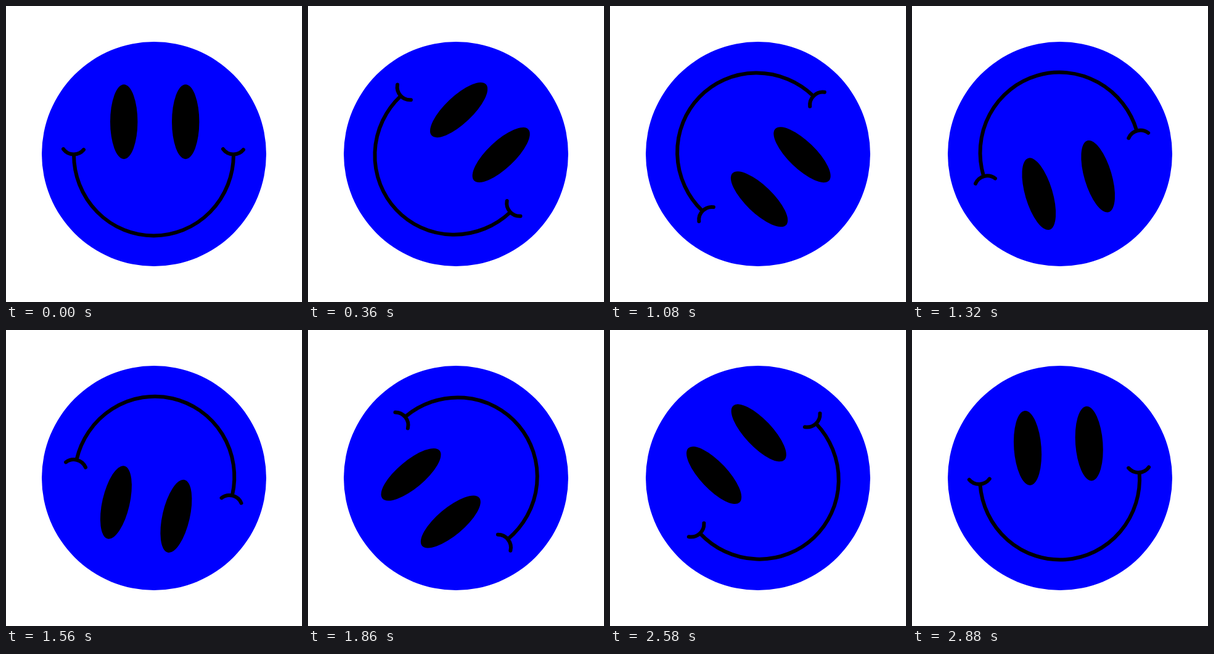
Animation of 480 by 480 pixels, one loop 2940 ms. Source, as an HTML page with a canvas:

```html
<!DOCTYPE html>
<html lang="en">
<head>
<meta charset="utf-8">
<title>Rolling smile</title>
<style>
  html, body { margin: 0; width: 100%; height: 100%; overflow: hidden; background: #fff; }
  canvas { display: block; width: 480px; height: 480px; }
</style>
</head>
<body>
<canvas id="stage" width="480" height="480"></canvas>
<script>
const ctx = document.getElementById("stage").getContext("2d");
const LOOP = 2940, STEP = 60, C = 240;

// [time in ms, clockwise turn in degrees]
const TURN = [[0, 0], [360, 46.7], [1080, 134], [1560, 192.9], [1860, 230], [2340, 285.2], [2880, 355.8], [2940, 360]];

function turnAt(t) {
  const i = TURN.findIndex(k => k[0] > t);
  const [t0, a0] = TURN[i - 1], [t1, a1] = TURN[i];
  return a0 + (a1 - a0) * (t - t0) / (t1 - t0);
}

function oval(x, y, rx, ry, color) {
  ctx.fillStyle = color;
  ctx.beginPath();
  ctx.ellipse(x, y, rx, ry, 0, 0, Math.PI * 2);
  ctx.fill();
}

const smile = new Path2D("M110 241 A129.5 131.5 0 0 0 369 241");
const cheeks = new Path2D("M93 232 A21 21 0 0 0 126 233 M352 232 A21 21 0 0 0 385 233");

function draw(t) {
  ctx.fillStyle = "#fff";
  ctx.fillRect(0, 0, 480, 480);
  oval(C, C, 182, 182, "#00f");

  ctx.save();
  ctx.translate(C, C);
  ctx.rotate(turnAt(t) * Math.PI / 180);
  ctx.translate(-C, -C);
  oval(191.2, 187.7, 22.2, 60.5, "#000");
  oval(291.2, 187.7, 22.2, 60.5, "#000");
  ctx.strokeStyle = "#000";
  ctx.lineWidth = 6;
  ctx.lineCap = "round";
  ctx.stroke(smile);
  ctx.stroke(cheeks);
  ctx.restore();
}

const start = performance.now();
function tick() {
  const t = (performance.now() - start) % LOOP;
  draw(Math.floor(t / STEP) * STEP);
  requestAnimationFrame(tick);
}
tick();
</script>
</body>
</html>
```
